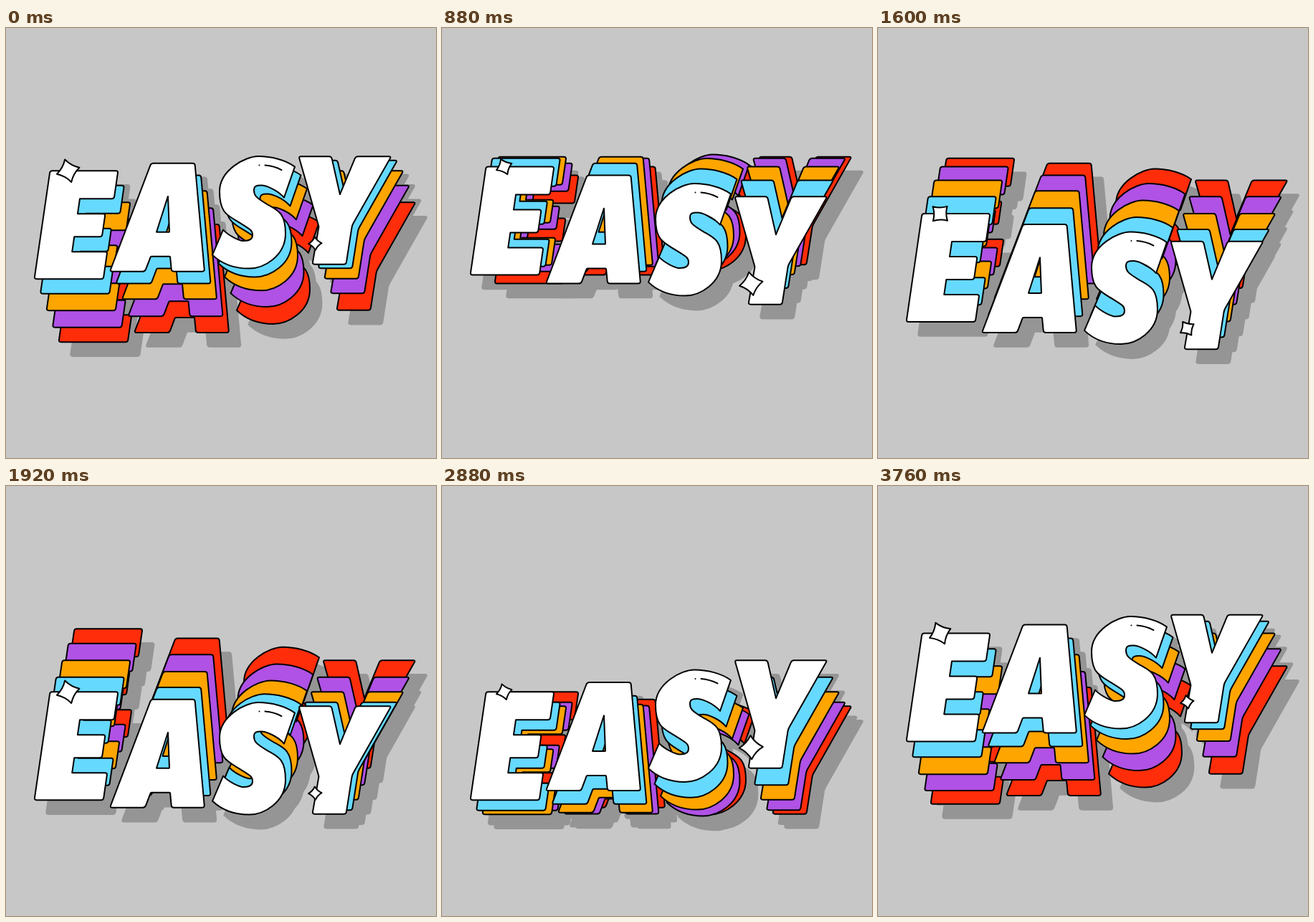
Animation, 600 px wide and 600 px high, one loop 3.84 s. Source, as an HTML page:

```html
<!DOCTYPE html>
<html lang="en">
<head>
<meta charset="utf-8">
<title>EASY</title>
<style>
  html, body { margin: 0; width: 100%; height: 100%; overflow: hidden; background: #c7c7c7; }
  svg { display: block; width: 100vw; height: 100vh; }
</style>
</head>
<body>
<svg viewBox="0 0 600 600" role="img" aria-label="EASY" stroke="#000" stroke-width="2"
     stroke-linejoin="round" stroke-linecap="round" fill-rule="evenodd">
  <g id="shadow" transform="translate(16.4 19.8)" fill="#959595" stroke="#959595"></g>
  <g id="word"></g>
</svg>
<script>
const LOOP = 3840, STEP = 80;
const TOP = 179.2, SWING = 128;
const COLORS = ['#fff', '#66d9ff', '#ffa500', '#af52e5', '#ff2d0a'];
const LAYER_X = 8.5, LAYER_LAG = 22.5, LETTER_LAG = 15;

// Polygon with rounded corners; a third value overrides the radius.
function poly(points, radius = 3.2) {
  const n = points.length;
  const toward = (p, q, r) => {
    const k = r / Math.hypot(q[0] - p[0], q[1] - p[1]);
    return `${p[0] + (q[0] - p[0]) * k} ${p[1] + (q[1] - p[1]) * k}`;
  };
  return points.map((p, i) => {
    const r = p[2] ?? radius;
    const from = toward(p, points[(i + n - 1) % n], r);
    const to = toward(p, points[(i + 1) % n], r);
    return `${i ? 'L' : 'M'}${from}Q${p[0]} ${p[1]} ${to}`;
  }).join('') + 'Z';
}

// Three slanted bars on a stem.
function letterE() {
  const stem = 108.7, left = 61.5, foot = 151;
  const lean = (x, y, r) => [x - y * 0.1457, y, r];
  const bar = (y, end, right) => [
    lean(stem, y, 0), lean(right, y), lean(right, end), lean(stem, end, 0)
  ];
  const bars = [bar(0, 39, 156.4), bar(60, 92, 147.3), bar(113, foot, 157.8)].flat();
  return poly([lean(left, 0), ...bars.slice(1, -1), lean(left, foot)]);
}

const letterA = () =>
  poly([[202.5, 0], [263.5, 0], [277, 151], [231, 151], [229, 130, 1],
        [202, 130, 1], [194, 151], [145, 151]]) +
  poly([[226, 46], [228, 96], [210, 96]], 0.5);

const letterS = () =>
  'M403 14.5C390 5 370 0 352 0S298 19 298 49S309 82 325 92S344 103 344 110' +
  'S338 118 332 118S311 111 303 102.5L288 137.5C300 149 318 156.5 339 156.5' +
  'S390 139 390 108S378 75 363 66S346 54 346 47.5S350 40.5 356 40.5S378 46 388 57.5Z';

const letterY = () =>
  poly([[408.5, 0], [454, 0], [466, 53, 0], [488, 0], [537.5, 0], [483, 96],
        [474.5, 150.5], [427.5, 150.5], [436.5, 98, 1]]);

const letters = [letterE, letterA, letterS, letterY].map((shape, i, all) => ({
  path: shape(),
  top: shape === letterS ? TOP - 2.6 : TOP,
  lag: (all.length - 1 - i) * LETTER_LAG
}));

const sparkles = [
  { on: letters[0], x: 86.7, y: 0, min: 11, lag: 202, turn: -16 },
  { on: letters[3], x: 431.3, y: 121.5, min: 9.2, lag: 0, turn: -3 }
];
const SPARKLE_MAX = 16.6;

// Eased swing 0..1..0 over 360 degrees.
function wave(deg) {
  const u = 1 - Math.abs(1 - ((deg + 720) % 360) / 180);
  return u * u * (3 - 2 * u);
}

const byId = id => document.getElementById(id);

function add(parent, tag, attrs = {}) {
  const el = document.createElementNS('http://www.w3.org/2000/svg', tag);
  for (const key in attrs) el.setAttribute(key, attrs[key]);
  return parent.appendChild(el);
}

const layers = [];
for (const letter of letters) {
  for (let i = COLORS.length - 1; i >= 0; i--) {
    const shade = add(byId('shadow'), 'path', { d: letter.path });
    const group = add(byId('word'), 'g');
    add(group, 'path', { d: letter.path, fill: COLORS[i] });
    layers.push({ letter, i, nodes: [shade, group] });
    if (i === 0) letter.face = group;
  }
}

// Glint on the S.
add(letters[2].face, 'path', {
  d: 'M353.5 12.5h.01M361.5 12.5Q374 13.5 384.5 19', fill: 'none'
});

// Star of radius 100, scaled at draw time.
for (const s of sparkles) {
  s.node = add(byId('word'), 'path', {
    d: 'M0-100Q35-35 100 0Q35 35 0 100Q-35 35-100 0Q-35-35 0-100Z',
    fill: '#fff', 'vector-effect': 'non-scaling-stroke'
  });
}

const height = (letter, angle, i = 0) =>
  letter.top + SWING * wave(angle - letter.lag - i * LAYER_LAG);

function draw(time) {
  const angle = Math.floor((time % LOOP) / STEP) * STEP / LOOP * 360;
  for (const { letter, i, nodes } of layers) {
    const move = `translate(${i * LAYER_X} ${height(letter, angle, i)})`;
    for (const node of nodes) node.setAttribute('transform', move);
  }
  for (const s of sparkles) {
    const size = s.min + (SPARKLE_MAX - s.min) * wave(2 * angle - s.lag);
    s.node.setAttribute('transform',
      `translate(${s.x} ${height(s.on, angle) + s.y}) rotate(${s.turn + angle}) scale(${size / 100})`);
  }
}

const start = performance.now();
function tick() {
  draw(performance.now() - start);
  requestAnimationFrame(tick);
}
tick();
</script>
</body>
</html>
```
